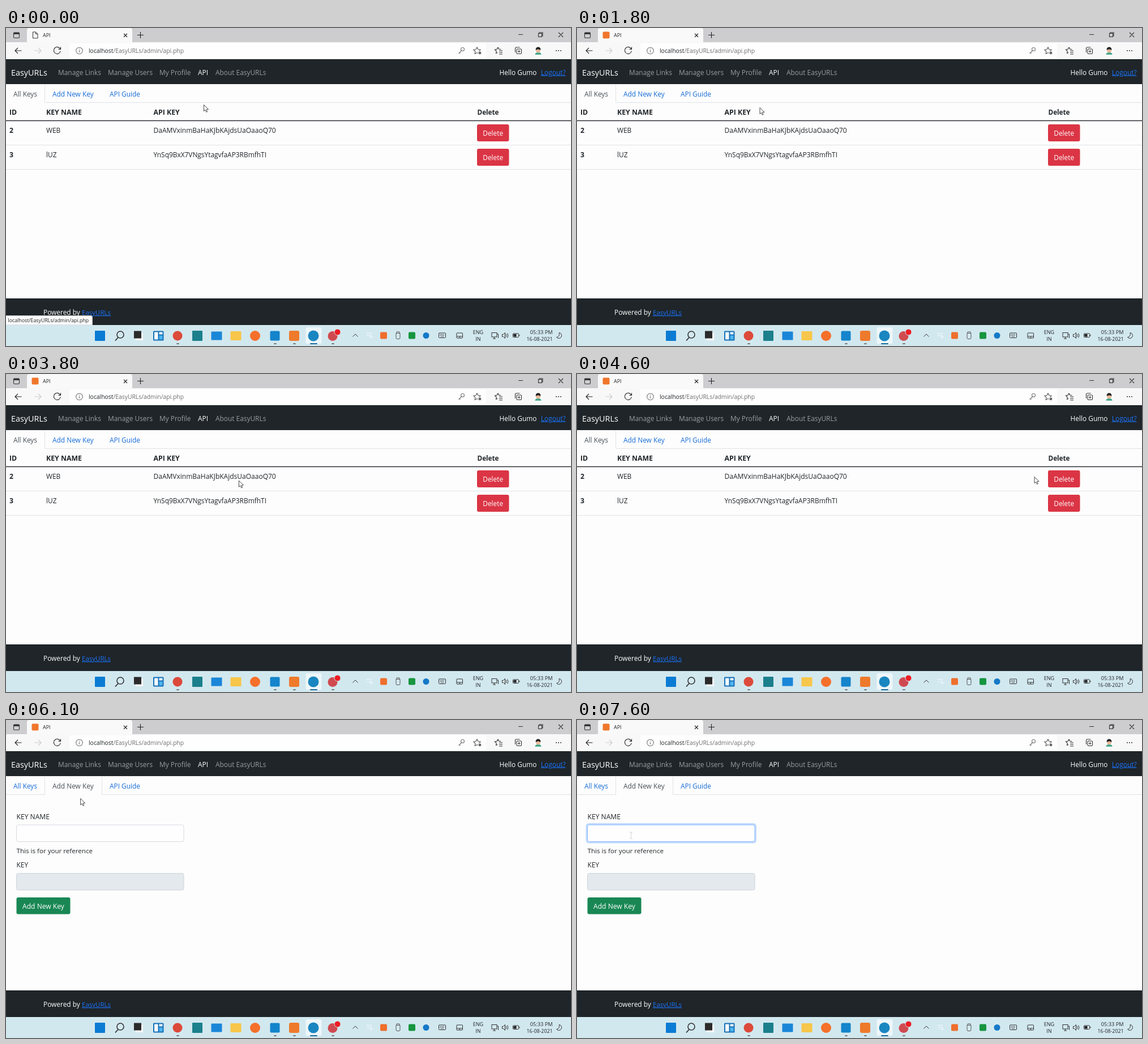
An HTML page that plays this animation: 998x561 px, repeating every 8 s.

```html
<!DOCTYPE html>
<html lang="en">
<head>
<meta charset="utf-8">
<title>API</title>
<style>
  html, body { margin: 0; height: 100%; overflow: hidden; }
  svg { display: block; width: 100vw; height: 100vh; }
  text { font: 11.9px "Open Sans", "Noto Sans", sans-serif; fill: #212529; white-space: pre; }
  .bold { font-size: 12.3px; font-weight: 700; }
  .small { font-size: 9px; }
  .nav text { fill: #9a9d9f; }
  .nav .on, .white { fill: #fff !important; }
  .link { fill: #166cd8; }
  .link.hover { fill: #0a58ca; }
  .under { fill: #1a73fb !important; text-decoration: underline; }
  .active { fill: #495057; }
  .mid { text-anchor: middle; }
  .end { text-anchor: end; }
  .line { fill: none; stroke: #333; }
  .rule { fill: none; stroke: #dfe3e7; }
</style>
</head>
<body>
<svg viewBox="0 0 998 561" preserveAspectRatio="none">
  <rect width="998" height="561" fill="#fdfdfd"/>

  <!-- browser frame -->
  <rect width="998" height="26" fill="#cdcccf"/>
  <path d="M37 25V4q0-4 4-4H219q4 0 4 4V25Z" fill="#f9f9f9"/>
  <rect y="25" width="998" height="30" fill="#f8f8f8"/>
  <rect x="112" y="27" width="736" height="26" rx="3" fill="#fefefe"/>
  <g class="line" stroke-width="1.1">
    <rect x="13.5" y="8" width="10" height="9.5" rx="1.5"/>
    <path d="M13.5 9.5h10" stroke-width="3"/>
    <path d="M208 10l6 6m0-6l-6 6M232 12.500h11m-5.500-5.500v11" stroke="#222"/>
    <path d="M905 11.500h8M976 8l8 8m0-8l-8 8M942 9.500v-1.500h6v6h-1.500"/>
    <rect x="940.500" y="9.500" width="6" height="6"/>
    <path d="M27.500 40H16m5-5l-5 5 5 5" stroke="#222"/>
    <path d="M50.500 40H62m-5-5l5 5-5 5" stroke="#ccc"/>
    <path d="M95.800 37a6 6 0 1 0 .5 3.500M96.500 33.500v4h-4" stroke="#222"/>
    <circle cx="129.500" cy="40" r="5.800" stroke="#777"/>
    <path d="M129.500 39v4m0-6.500v1.200" stroke="#777"/>
    <g stroke="#777"><circle cx="806.500" cy="37.500" r="3"/><path d="M804.500 40l-5 5M801 43.500l1.500 1.500"/></g>
    <path id="star" d="M832 34l1.900 3.800 4.200.6-3 3 .7 4.200-3.800-2-3.800 2 .7-4.200-3-3 4.200-.6Z" stroke="#555"/>
    <circle cx="837" cy="44" r="3" fill="#666" stroke="#fff"/>
    <path d="M869 34l1.700 3.300 3.600.5M869 34l-1.800 3.500-3.800.6 2.800 2.700-.6 3.800 2.600-1.400M871 40h6m-6 3h6m-6 3h6"/>
    <rect x="902" y="37" width="8.500" height="8.500" rx="1.500"/>
    <path d="M899.500 43v-7q0-2 2-2h6M906.200 39v4.500m-2.200-2.200h4.500"/>
  </g>
  <circle cx="940" cy="40" r="7.500" fill="#fff"/>
  <path d="M934.500 47q0-4 5.500-4t5.500 4Z" fill="#43a889"/>
  <circle cx="940" cy="39.500" r="4" fill="#e9b89b"/>
  <path d="M935.500 39q0-5.500 4.500-5.500t4.500 5.500q-4.500-3-9 0Z" fill="#222"/>
  <g fill="#333"><circle cx="972" cy="40" r="1"/><circle cx="976" cy="40" r="1"/><circle cx="980" cy="40" r="1"/></g>
  <path id="blankIcon" class="line" d="M47.500 7h5l3.500 3.500V18h-8.500ZM52.500 7v3.500H56"/>
  <rect id="siteIcon" x="45.500" y="6.500" width="12" height="12" rx="2" fill="#f0762b"/>
  <text x="65" y="16" class="small">API</text>
  <text x="146" y="44" style="font-size:10.36px">localhost<tspan fill="#6d6d6d">/EasyURLs/admin/api.php</tspan></text>

  <!-- site header and footer -->
  <path d="M0 55H998V99H0ZM0 477H998V524H0Z" fill="#1f2529"/>
  <g class="nav">
    <text x="9" y="83.500" class="on" style="font-size:14.4px">EasyURLs</text>
    <text x="92" y="82.500">Manage Links</text>
    <text x="180" y="82.500">Manage Users</text>
    <text x="271" y="82.500">My Profile</text>
    <text x="339" y="82.500" class="on">API</text>
    <text x="370" y="82.500">About EasyURLs</text>
    <text x="871.500" y="82.500" class="on">Hello Gumo</text>
    <text x="988.500" y="82.500" class="under end">Logout?</text>
    <text x="66" y="506" class="on">Powered by</text>
    <text x="134" y="506" class="under" style="font-size:11.5px">EasyURLs</text>
  </g>

  <!-- tabs -->
  <path class="rule" d="M68.500 131.500V99.500M169 131.500H998"/>
  <path class="rule" id="edge" d="M169.500 131.500V99.500"/>
  <path class="rule" id="baseAll" d="M0 131.500H69"/>
  <path class="rule" id="baseAdd" d="M69 131.500H170"/>
  <text x="13" y="121" id="tabAll">All Keys</text>
  <text x="82" y="121" id="tabAdd">Add New Key</text>
  <text x="183" y="121" class="link">API Guide</text>

  <g id="listPage">
    <text x="6" y="152.500" class="bold">ID</text>
    <text x="71" y="152.500" class="bold">KEY NAME</text>
    <text x="260.500" y="152.500" class="bold">API KEY</text>
    <text x="832.500" y="152.500" class="bold" style="font-size:11.7px">Delete</text>
    <path d="M0 163.500H998" stroke="#2b2f32" stroke-width="1.400"/>
    <path class="rule" d="M0 206.500H998"/>
    <path class="rule" d="M0 249.500H998" stroke-width="1.200"/>
    <text x="6" y="185" class="bold">2</text>
    <text x="71" y="185">WEB</text>
    <text x="260.500" y="185" style="font-size:12px">DaAMVxinmBaHaKJbKAjdsUaOaaoQ70</text>
    <text x="6" y="227.500" class="bold">3</text>
    <text x="71" y="227.500">lUZ</text>
    <text x="260.500" y="227.500">YnSq9BxX7VNgsYtagvfaAP3RBmfhTI</text>
    <rect x="832" y="170" width="56.500" height="30" rx="3" fill="#db3545"/>
    <rect x="832" y="213" width="56.500" height="30" rx="3" fill="#db3545"/>
    <text x="860.200" y="190" class="white mid">Delete</text>
    <text x="860.200" y="233" class="white mid">Delete</text>
  </g>

  <g id="formPage">
    <text x="18.500" y="174.500" style="font-size:12.1px">KEY NAME</text>
    <rect id="ring" x="17" y="183.500" width="298.500" height="32.500" rx="4" fill="none" stroke="#c2dbfe" stroke-width="3"/>
    <rect id="field" x="18.500" y="185" width="295.500" height="29.500" rx="3" fill="#fefefe"/>
    <path id="caret" d="M28.500 192V207" stroke="#222"/>
    <text x="18.500" y="235" style="font-size:11.6px">This is for your reference</text>
    <text x="18.500" y="260">KEY</text>
    <rect x="18.500" y="270.500" width="295.500" height="29.500" rx="3" fill="#e4e9ee" stroke="#ced4da"/>
    <rect x="18.500" y="313" width="95" height="29.500" rx="3" fill="#198754"/>
    <text x="66" y="332.500" class="white mid" style="font-size:12.1px">Add New Key</text>
  </g>

  <g id="status">
    <path d="M-1 507.500H149.500q3 0 3 3V524H-1Z" fill="#fbfbfb" stroke="#c4c4c4"/>
    <text x="3.500" y="519" style="font-size:8.8px">localhost/EasyURLs/admin/api.php</text>
  </g>

  <!-- taskbar -->
  <rect y="524" width="998" height="37" fill="#d2e8ef"/>
  <rect x="529.500" y="528" width="28" height="29" rx="3" fill="#edf6f9"/>
  <g id="apps"></g>
  <g class="line" stroke="#222">
    <circle cx="202" cy="541" r="6" stroke-width="1.600"/><path d="M198 546l-5 5.500" stroke-width="1.800"/>
  </g>
  <rect x="229" y="538" width="13" height="13" fill="#fafafa"/>
  <rect x="226" y="534.500" width="13" height="13" fill="#2b2b2b"/>
  <rect x="260" y="534.500" width="18.500" height="17" rx="1.500" fill="#1670b8"/>
  <path d="M262 536.500h6.500v13H262ZM270.500 536.500h6v4h-6Z" fill="#f8fcff"/>
  <path d="M270.500 542.500h6v7h-6Z" fill="#4db6ef"/>
  <circle cx="585.500" cy="536.500" r="5.500" fill="#ed1c24" stroke="#d2e8ef"/>
  <g stroke="#777" stroke-width="2" stroke-linecap="round"><path d="M302 557h3M474 557h3M508 557h3M576 557h3"/><path d="M538 557h11" stroke="#176a9c"/></g>
  <g class="line">
    <path d="M612.500 544.500l4.500-4.500 4.500 4.500"/>
    <path d="M637 538.500h6M637 542.500h6M645 537v9m-3-2l3 3 3-3" stroke="#f4fafc"/>
    <path d="M690 538.500v-2.500h5v2.500M689 538.500h7v8q0 2-2 2h-3q-2 0-2-2Z" stroke="#555"/>
    <rect x="764.500" y="538" width="12" height="8.500" rx="1"/>
    <path d="M766.500 540.500h8m-8 2h8M768 544.500h5" stroke-dasharray="1.200 .8"/>
    <rect x="796" y="538" width="10.500" height="9" rx="1"/><path d="M796 544h10.500m-5.200 0v3"/>
    <rect x="858" y="537.500" width="9" height="7.500"/><path d="M860 548h5m-2.500-3v3M867 540h2.500v7"/>
    <path d="M876.500 540.500h2l3-3v10l-3-3h-2ZM883.500 540q1.500 2.500 0 5M885.500 538.500q3 4 0 8"/>
    <rect x="895.500" y="539" width="10" height="6.500" rx="1"/><path d="M907 541v2.500"/>
    <path d="M977 537.500a5 5 0 1 1-4.500 8q6-1 4.500-8Z"/>
  </g>
  <rect x="896.500" y="540" width="5" height="4.500" fill="#222"/>
  <text x="834" y="540" class="small mid">ENG</text>
  <text x="834" y="551.500" class="small mid">IN</text>
  <text x="965.500" y="540" class="small end" style="font-size:9.2px">05:33 PM</text>
  <text x="965.500" y="551.500" class="small end" style="font-size:8.8px">16-08-2021</text>

  <!-- pointer shapes -->
  <g id="pointer">
    <path id="arrow" d="M.5.500V11.700L3 9.500 4.900 13.400 6.700 12.600 4.900 8.800 8.500 8.500Z" fill="#fff" stroke="#333" stroke-width=".9"/>
    <path id="hand" d="M-.5 1q1.200-1.200 2.200 0V6q1.300-.8 2 .4 1.400-.7 2 .5 1.600-.5 2 .9V11L6.200 15.500H1L-3.500 9.500q-.2-1.700 1.500-1.200L-.5 9.800Z" fill="#fff" stroke="#333" stroke-width=".9"/>
    <path id="beam" d="M0-2h5M2.500-2V9M0 9h5" fill="none" stroke="#777" stroke-opacity=".3"/>
  </g>
</svg>
<script>
const $ = id => document.getElementById(id);
const show = (id, on) => { $(id).style.display = on ? '' : 'none'; };

// Plain app marks: centre x, centre y, width, height, corner radius, colour
$('apps').innerHTML = [
  [166, 543, 18, 18, 1, '#0b7bd4'], [303, 543, 17, 17, 9, '#dc4a3a'],
  [338, 543, 18, 18, 1, '#1b808c'], [372, 543, 19, 15, 1, '#1a86d8'],
  [406, 543, 19, 16, 1, '#f7c64a'], [440, 543, 18, 18, 9, '#f5702a'],
  [475, 543, 17, 17, 2, '#1484cc'], [509, 543, 18, 18, 3, '#ee7a2c'],
  [543, 543, 19, 19, 10, '#1a86c0'], [577, 543.5, 17, 17, 9, '#cf4a50'],
  [667, 542.5, 12, 12, 2, '#ee6f2d'], [717, 542.5, 12, 12, 2, '#17953f'],
  [742, 542.5, 11, 11, 6, '#1479c8']
].map(([x, y, w, h, r, c]) =>
  `<rect x="${x - w / 2}" y="${y - h / 2}" width="${w}" height="${h}" rx="${r}" fill="${c}"/>`).join('');

// Pointer path: time, x, y
const path = [
  [0, 349, 135], [400, 349, 139], [600, 349, 139], [700, 353, 140], [900, 353, 140],
  [1200, 322.5, 140], [1800, 322.5, 140], [2600, 98, 190], [2900, 109, 196],
  [3500, 300, 190], [3600, 300, 190], [4500, 799, 179], [4600, 807.5, 181],
  [4800, 814, 182], [4900, 814, 182], [5800, 142, 122], [5900, 139, 119.5],
  [6000, 139, 119.5], [6300, 115.5, 175], [6700, 100, 192], [7400, 93, 200], [8000, 93, 200]
];

function pointerAt(t) {
  const i = path.findIndex(p => p[0] > t);
  const [t0, x0, y0] = path[i - 1], [t1, x1, y1] = path[i];
  const k = (t - t0) / (t1 - t0);
  return [x0 + (x1 - x0) * k, y0 + (y1 - y0) * k];
}

function render(time) {
  const t = Math.floor(time % 8000 / 100) * 100;
  const [x, y] = pointerAt(t);
  const form = t >= 6100, focused = t >= 7100;
  const hover = x > 69 && x < 169 && y > 99 && y < 131;
  const typing = form && y > 185 && y < 214;

  show('blankIcon', t < 200);
  show('siteIcon', t >= 200);
  show('status', t < 400);
  show('listPage', !form);
  show('formPage', form);
  show('baseAll', form);
  show('baseAdd', !form);
  show('edge', form || hover);
  $('tabAll').setAttribute('class', form ? 'link' : 'active');
  $('tabAdd').setAttribute('class', form ? 'active' : hover ? 'link hover' : 'link');
  show('ring', focused);
  show('caret', focused && (t - 7100) % 1000 < 500);
  $('field').setAttribute('stroke', focused ? '#86b7fe' : '#d5dae0');
  show('hand', hover);
  show('beam', typing);
  show('arrow', !hover && !typing);
  $('pointer').setAttribute('transform', `translate(${x} ${y})`);
}

const start = performance.now();
function tick() {
  render(performance.now() - start);
  requestAnimationFrame(tick);
}
tick();
</script>
</body>
</html>
```
